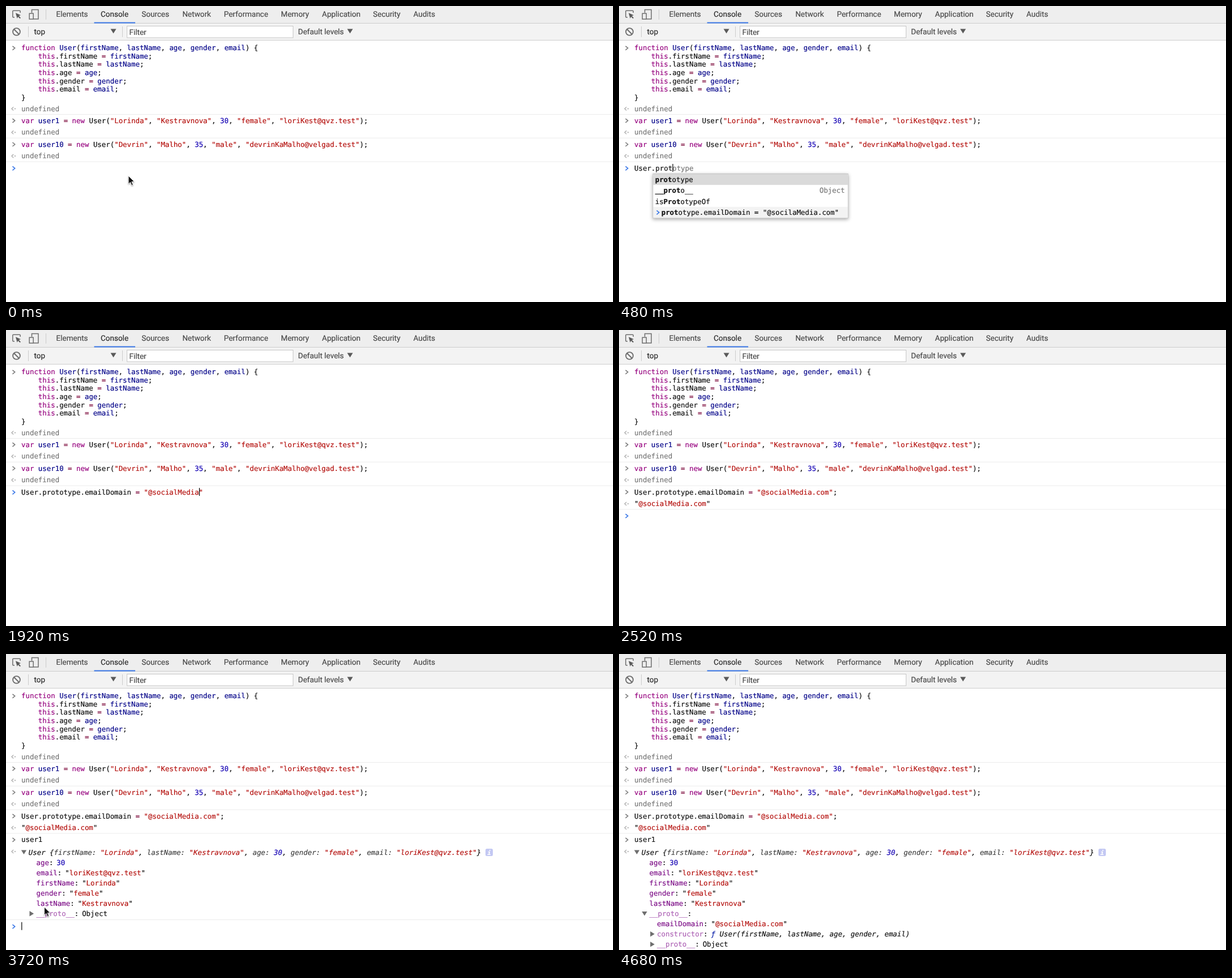
Animation of 1071 by 523 pixels, one loop 5.18 s. Source, as an HTML page:

```html
<!DOCTYPE html>
<html lang="en">
<head>
<meta charset="utf-8">
<title>Console</title>
<style>
  html, body { margin: 0; width: 100%; height: 100%; overflow: hidden; background: #fff; }
  svg { display: block; width: 1071px; height: 523px; }
  text { font: 12.4px "DejaVu Sans Mono", monospace; color: #111; white-space: pre; text-rendering: geometricPrecision; }
  text, tspan { fill: currentColor; stroke: currentColor; stroke-width: .18px; }
  .ui text { font: 13.5px Roboto, sans-serif; color: #484848; }
  .ui text.on { color: #2b2b2b; }
  .it { font-style: italic; }
  .b { font-weight: bold; }
  .kw { color: #96007e; }
  .op { color: #801040; }
  .id { color: #000088; }
  .num { color: #1400b4; }
  .str { color: #b40f0c; }
  .key { color: #7c0c86; }
  .dim { color: #ad62b5; }
  text.gray, .gray { color: #767676; }
  text.prev, .prev { color: #404040; }
  .fn { color: #0d22aa; }
  .line { fill: none; stroke-width: 1.6; }
  .pop { filter: drop-shadow(0 2px 3px rgba(0, 0, 0, .35)); }
  .mouse { filter: drop-shadow(0 1px 1px rgba(0, 0, 0, .4)); }
</style>
</head>
<body>
<svg viewBox="0 0 1071 523" xmlns="http://www.w3.org/2000/svg">
  <g class="ui">
    <rect width="1071" height="60" fill="#f3f3f3"/>
    <rect width="1071" height="30" fill="#eeeeee"/>
    <path d="M0 30.5H1071M0 60.5H1071" stroke="#cdcdcd"/>
    <rect x="155.5" y="28.6" width="72.5" height="2" fill="#3b78e7"/>
    <path d="M70.5 6V24M39.5 36V55M205.5 36V55" stroke="#ccc"/>
    <g fill="none" stroke="#6e6e6e" stroke-width="1.5">
      <path d="M15 20H13Q11.8 20 11.8 18.8V9.4Q11.8 8.2 13 8.2H24Q25.2 8.2 25.2 9.4V12"/>
      <path d="M45.5 12V6.5H57V23H49"/>
      <rect x="41.2" y="13.2" width="7" height="10"/>
      <circle cx="18.5" cy="45.5" r="6.4" stroke-width="1.9"/>
      <path d="M14 41L23 50" stroke-width="1.9"/>
    </g>
    <path d="M17 12.2L26 16.2L22.7 17.5L26 21L24.5 22.3L21.2 18.9L19.7 22Z" fill="#5a5a5a"/>
    <rect x="213.5" y="35.5" width="293" height="20.5" fill="#fff" stroke="#c6c6c6"/>
    <path d="M184.5 40.5H194.5L189.5 48.5ZM602 40.5H612L607 48.5Z" fill="#5a5a5a"/>
    <g id="tabs"></g>
    <text x="49.5" y="49.8" class="on">top</text>
    <text x="217.5" y="50.8">Filter</text>
    <text x="515.3" y="49.8">Default levels</text>
  </g>
  <g id="log"></g>
  <g id="live"></g>
</svg>
<script>
const $ = id => document.getElementById(id);
const CW = 7.465, STEP = 120, LOOP = 5180, LAST = 39;

const first = 'Lorinda', last = 'Kestravnova', mail = 'loriKest@qvz.test';
const past = 'User.prototype.emailDomain = "@socilaMedia.com"';
const typed = 'User.prototype.emailDomain = "@socialMedia.com";';

// y values are the middle of the capitals
const text = (x, y, body, cls = '') => `<text x="${x}" y="${y + 4.5}" class="${cls}" xml:space="preserve">${body}</text>`;
const span = (cls, s) => `<tspan class="${cls}">${s}</tspan>`;
const rule = y => `<path d="M0 ${y}H1071" stroke="#ececec"/>`;
const chevron = (y, color = '#7d7d7d', x = 11.5) =>
  `<path class="line" d="M${x} ${y - 3.2}L${x + 4.2} ${y + .3}L${x} ${y + 3.8}" stroke="${color}"/>`;
const blue = '#3b78e7';
const back = y => `<path class="line" d="M13.2 ${y - 2.6}L10 ${y + .5}L13.2 ${y + 3.6}" stroke="#a8a8a8" style="stroke-width:1.3"/>
  <circle cx="16" cy="${y + .5}" r="1.1" fill="#a8a8a8"/>`;
const down = (x, y) => `<path d="M${x - 4.7} ${y - 3.8}h9.4l-4.7 7.6Z" fill="#6e6e6e"/>`;
const right = (x, y) => `<path d="M${x - 3.8} ${y - 4.7}v9.4l7.6 -4.7Z" fill="#6e6e6e"/>`;

const syntax = /("[^"]*"?)|\b(function|var|new|this)\b|\b(\d+)\b|(=)|((?<=var |function )\w+|(?<!\.)\b(?:firstName|lastName|age|gender|email)\b)/g;
const paint = code => code.replace(syntax, (m, str, kw, num, op) =>
  span(str ? 'str' : kw ? 'kw' : num ? 'num' : op ? 'op' : 'id', m));

const input = (y, code) => chevron(y) + text(27, y, paint(code));
const undef = y => back(y) + text(27, y, 'undefined', 'gray') + rule(y + 10.5);
const quoted = s => '"' + span('str', s) + '"';

function buildLog() {
  const fields = ['firstName', 'lastName', 'age', 'gender', 'email'];
  const lines = [`function User(${fields.join(', ')}) {`, ...fields.map(f => `    this.${f} = ${f};`), '}'];
  return chevron(74) + lines.map((l, i) => text(27, 73.6 + i * 14.65, paint(l))).join('') + undef(181) +
    input(202.3, `var user1 = new User("${first}", "${last}", 30, "female", "${mail}");`) + undef(222.8) +
    input(244.2, 'var user10 = new User("Devrin", "Malho", 35, "male", "devrinKaMalho@velgad.test");') + undef(264.6);
}

// rows: "*bold*rest|label", a leading ">" marks a history entry
function popup(x, y, width, rows, height = rows.length * 19.3) {
  const items = rows.map((row, i) => {
    const [name, label] = row.split('|');
    const old = name[0] === '>';
    const top = y + i * 19.3, mid = top + 9.6;
    const bg = i === 0 ? '#dadada' : old ? '#f3f3f3' : '#fff';
    const body = name.slice(old ? 1 : 0).replace(/\*(.+?)\*/, (m, s) => span('b', s));
    return `<rect x="${x}" y="${top}" width="${width}" height="19.3" fill="${bg}"/>` +
      (old ? chevron(mid, blue, x + 6) : '') + text(x + (old ? 14.2 : 3.2), mid, body) +
      (label ? text(x + width - 5 - label.length * CW, mid, label, i ? 'gray' : 'prev') : '');
  }).join('');
  return `<g class="pop"><rect x="${x - .5}" y="${y - .5}" width="${width + 1}" height="${height + 1}" fill="#fff" stroke="#c4c4c4"/>${items}</g>`;
}

function prompt(y, code = '', ghost = '', caret = true) {
  const x = 27 + code.length * CW;
  return chevron(y + .5, blue) + (ghost ? text(x, y, ghost, 'gray') : '') +
    (caret ? `<path d="M${x + .8} ${y - 7}v14" stroke="#000" stroke-width="1.2"/>` : '');
}

const counts = [0, 1, 3, 5, 9, 12, 15, 18, 21, 25, 27, 29, 31, 34, 37, 39, 42, 46, 48];
const members = ['arguments', 'caller', 'length', 'name', 'prototype', 'apply|Function', 'bind', 'call',
  'constructor', 'toString', '__proto__|Object'];

function firstEntry(k) {
  const n = counts[k], code = typed.slice(0, n), y = 286;
  if (n > 29) {
    const close = n < 47 ? '"' : '';
    return text(27, y, paint(code + close)) + prompt(y, code);
  }
  const goal = n < 4 ? 'User' : n === 5 ? 'User.arguments' : n < 15 ? 'User.prototype' : past;
  const out = text(27, y, n < 28 ? code : paint(code)) + prompt(y, code, n ? goal.slice(n) : '', n > 0);
  const tail = past.slice(5), hit = code.slice(5);
  const old = `>*${hit}*${tail.slice(hit.length)}`;
  if (k === 2) return out + popup(23.5, 297, 380, ['*Use*r|Window', '*use*r1', '*use*r10', '>*Use*' + past.slice(3)]);
  if (k === 3) return out + popup(60.5, 297, 343, members, 217);
  if (k === 4) return out + popup(60.5, 297, 343, ['*prot*otype', '*__prot*o__|Object', 'is*Prot*otypeOf', old]);
  if (k === 5) return out + popup(60.5, 297, 343, ['*prototy*pe', 'is*Prototy*peOf|Object', old]);
  return out;
}

function secondEntry(k) {
  const y = 327.8;
  if (k < 25) return prompt(y, '', '', k < 21 || k > 22);
  const code = 'user1'.slice(0, k === 25 ? 2 : k === 26 ? 4 : 5);
  const out = text(27, y, code) + prompt(y, code, 'user1'.slice(code.length));
  if (k === 26) return out + popup(23.5, 338.7, 115.5, ['*user*1|Window', '*user*10', '*User*', '>*user*1']);
  if (k === 27) return out + popup(23.5, 338.7, 115.5, ['*user1*|Window', '*user1*0', '>*user1*']);
  return out;
}

const prop = (x, y, key, value, cls = 'key') =>
  text(x, y, span(cls, key) + ':') + text(x + (key.length + 1) * CW + 6, y, value);

function result(k) {
  const open = k >= 31, deep = k >= 33, row = i => 368.4 + i * 18.06;
  const pair = (key, cls, value) => span('prev', key + ': ') + span(cls, value);
  const preview = 'User {' + [pair('firstName', 'str', `"${first}"`), pair('lastName', 'str', `"${last}"`),
    pair('age', 'num', 30), pair('gender', 'str', '"female"'), pair('email', 'str', `"${mail}"`)].join(', ') + '}';
  let out = chevron(328) + text(27, 327.8, 'user1') + back(348.5) + text(39.8, 350.3, preview, 'it');
  if (!open) return out + right(31.5, 350.3) + rule(361.5) + prompt(372.3);
  out += down(31.5, 350.3) + `<rect x="846" y="344" width="13" height="13" rx="2.5" fill="#c3c8f3"/>
    <text x="852.5" y="354.7" text-anchor="middle" class="it b" style="color:#fff;font-size:11px">i</text>`;
  [['age', span('num', 30)], ['email', quoted(mail)], ['firstName', quoted(first)],
    ['gender', quoted('female')], ['lastName', quoted(last)]]
    .forEach(([key, value], i) => out += prop(53.5, row(i), key, value));
  out += prop(53.5, row(5), '__proto__', deep ? '' : 'Object', 'dim');
  if (!deep) return out + right(45.3, row(5)) + rule(469.5) + prompt(480.8);
  return out + down(45, row(5)) + prop(67, row(6), 'emailDomain', quoted('@socialMedia.com')) +
    right(59, row(7)) + prop(67, row(7), 'constructor',
      `<tspan class="it">${span('fn', 'ƒ')} User(firstName, lastName, age, gender, email)</tspan>`, 'dim') +
    right(59, row(8)) + prop(67, row(8), '__proto__', 'Object', 'dim');
}

const trail = { 0: [216, 300], 29: [110, 335], 30: [31, 349], 31: [67.5, 447], 32: [46, 457], 33: [45, 457],
  34: [45, 458], 35: [47, 460], 36: [60, 468], 37: [85, 490], 38: [120, 514] };
const mouse = k => trail[k] ? `<path class="mouse" transform="translate(${trail[k]})" fill="#111" stroke="#fff"
  d="M0 0V14.6L3.4 11.5L5.9 17.2L8.3 16.2L5.9 10.6H10.6Z"/>` : '';

function scene(k) {
  if (k < 19) return firstEntry(k) + mouse(k);
  const done = input(286, typed) + back(306.5) + text(27, 306.5, quoted('@socialMedia.com')) + rule(317);
  return done + (k < 28 ? secondEntry(k) : result(k)) + mouse(k);
}

const tabs = { Elements: 88.6, Console: 167, Sources: 239.2, Network: 311.2, Performance: 384.5, Memory: 485.1,
  Application: 557.6, Security: 647.5, Audits: 718.8 };
$('tabs').innerHTML = Object.entries(tabs)
  .map(([name, x]) => `<text x="${x}" y="19.3" class="${name === 'Console' ? 'on' : ''}">${name}</text>`).join('');
$('log').innerHTML = buildLog();

const start = performance.now();
let shown = -1;
function tick() {
  const k = Math.min(LAST, Math.floor((performance.now() - start) % LOOP / STEP));
  if (k !== shown) $('live').innerHTML = scene(shown = k);
  requestAnimationFrame(tick);
}
tick();
</script>
</body>
</html>
```
